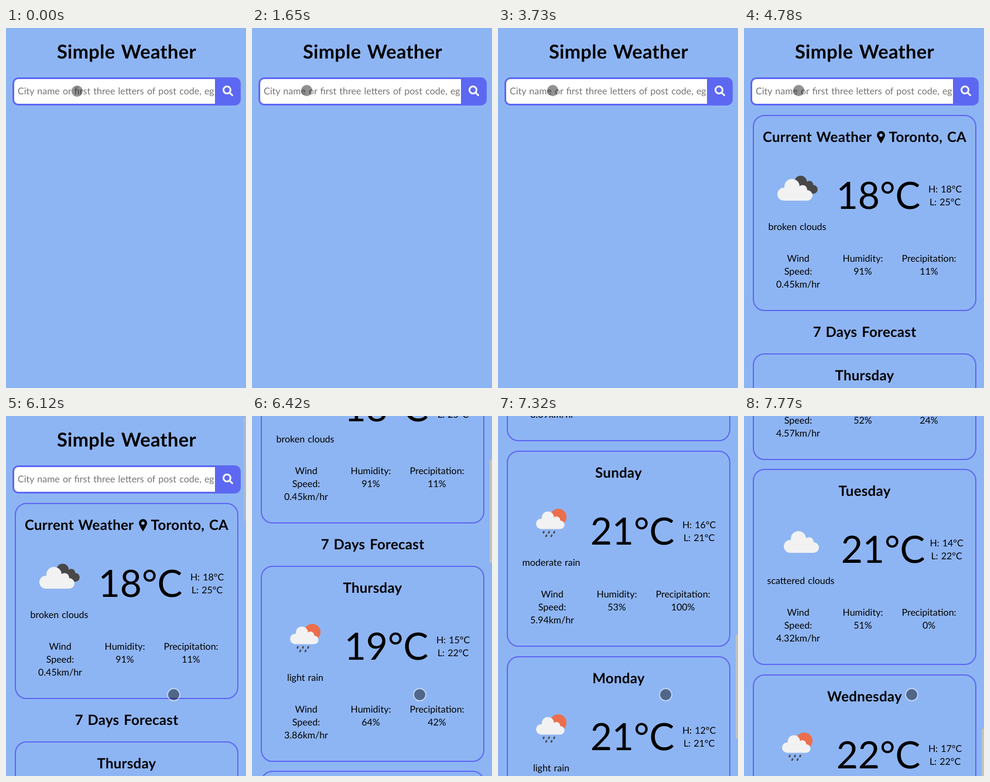
Write an HTML page with a canvas that moves like this. It is 410x613 px and loops after 8 s.

```html
<!DOCTYPE html>
<html lang="en">
<head>
<meta charset="utf-8">
<title>Weather</title>
<style>
html, body { margin: 0; width: 100%; height: 100%; overflow: hidden; background: #8eb5f3; }
canvas { display: block; width: 410px; height: 613px; }
</style>
</head>
<body>
<canvas id="stage"></canvas>
<script>
const W = 410, H = 613, LOOP = 8000, STEP = 150;
const BLUE = '#8eb5f3', VIOLET = '#5d68f2', SUN = '#ec6e4c', LIGHT = '#f2f2f2', DARK = '#484848';
const CARD_TOP = 148, DAYS_TOP = 554, PITCH = 349.75;
const FOCUS = 130, TYPING = 2400, TYPED = 3250, CLEARED = 3750, RESULTS = 4350, LEAVE = 5550, ARRIVE = 6150;
const QUERY = 'toronto';

const canvas = document.getElementById('stage');
const ctx = canvas.getContext('2d');
const dpr = window.devicePixelRatio || 1;
canvas.width = W * dpr;
canvas.height = H * dpr;
ctx.textRendering = 'geometricPrecision';

// title, sky, temperature, high, low, wind, humidity, precipitation
const [current, ...days] = `
Current Weather, broken clouds, 18, 18, 25, 0.45, 91, 11
Thursday, light rain, 19, 15, 22, 3.86, 64, 42
Friday, clear sky, 20, 14, 21, 6.68, 36, 17
Saturday, moderate rain, 18, 14, 22, 6.69, 58, 85
Sunday, moderate rain, 21, 16, 21, 5.94, 53, 100
Monday, light rain, 21, 12, 21, 4.57, 52, 24
Tuesday, scattered clouds, 21, 14, 22, 4.32, 51, 0
Wednesday, light rain, 22, 17, 22, 5.12, 49, 36
`.trim().split('\n').map(line => {
  const [title, sky, temp, high, low, wind, humidity, rain] = line.split(', ');
  return { title, sky, temp, high, low, wind, humidity, rain };
});

const clamp = u => Math.min(1, Math.max(0, u));
const progress = (t, start, length) => clamp((t - start) / length);
const easeInOut = u => u * u * (3 - 2 * u);
const flick = (t, start, length) => 1 - (1 - progress(t, start, length)) ** 1.27;

const stepped = t => Math.floor((t + 30) / STEP) * STEP;

const scrollAt = s =>
  299 * flick(s, 6150, 300) + 1245 * flick(s, 6600, 750) + 1399.5 * flick(s, 7500, 750);

function pointerAt(s) {
  const settle = progress(s, 0, 300);
  const leave = easeInOut(progress(s, LEAVE, ARRIVE - LEAVE));
  return [121.5 - 28 * settle + 193 * leave, 107.5 - settle + 368 * leave];
}

function queryAt(s) {
  if (s < TYPING || s >= CLEARED) return '';
  return QUERY.slice(0, 1 + (s - TYPING) / STEP);
}

function caretAt(t) {
  if (t < FOCUS || t > LEAVE + STEP) return false;
  if (t > TYPING && t < TYPED) return true;
  const start = t < TYPED ? FOCUS : TYPED;
  return Math.floor((t - start) / 480) % 2 === 0;
}

function text(str, x, y, { size = 16, bold = false, align = 'center', color = '#000' } = {}) {
  ctx.font = `${bold ? 'bold ' : ''}${size}px Lato, sans-serif`;
  ctx.wordSpacing = size * 0.066 + 'px';
  ctx.letterSpacing = bold ? size * 0.012 + 'px' : '0px';
  ctx.textAlign = align;
  ctx.fillStyle = color;
  ctx.fillText(str, x, y);
  return ctx.measureText(str).width;
}

function disc(x, y, r, color) {
  ctx.fillStyle = color;
  ctx.beginPath();
  ctx.arc(x, y, r, 0, Math.PI * 2);
  ctx.fill();
}

function box(x, y, w, h, radius, color) {
  ctx.fillStyle = color;
  ctx.beginPath();
  ctx.roundRect(x, y, w, h, radius);
  ctx.fill();
}

function cloud(x, y, scale, color) {
  ctx.save();
  ctx.translate(x, y);
  ctx.scale(scale, scale);
  disc(25, 13, 13, color);
  disc(43, 18.5, 8, color);
  disc(11, 26, 11, color);
  disc(51, 28, 9, color);
  box(11, 18, 39, 19, 0, color);
  ctx.restore();
}

// Icons are drawn relative to the first column and the card's top.
const icons = {
  'broken clouds'(x, y) {
    cloud(x - 15, y + 103.5, 0.83, DARK);
    cloud(x - 34, y + 109, 1, LIGHT);
  },
  'clear sky'(x, y) {
    disc(x + 0.5, y + 124.5, 24.5, SUN);
  },
  'scattered clouds'(x, y) {
    cloud(x - 29, y + 106, 1, LIGHT);
  },
  rain(x, y) {
    disc(x + 12, y + 113, 14, SUN);
    cloud(x - 26, y + 103.5, 0.81, LIGHT);
    ctx.strokeStyle = DARK;
    ctx.lineWidth = 2.6;
    ctx.beginPath();
    for (let i = 0; i < 5; i++) {
      const dropX = x - 13 + 4.5 * i, dropY = y + 139 + 6 * (i % 2);
      ctx.moveTo(dropX + 0.8, dropY - 2);
      ctx.lineTo(dropX - 0.8, dropY + 2);
    }
    ctx.stroke();
  }
};

function pin(x, y) {
  ctx.fillStyle = '#000';
  ctx.beginPath();
  ctx.arc(x, y, 7, Math.PI * 0.88, Math.PI * 2.12);
  ctx.quadraticCurveTo(x + 4, y + 8, x, y + 14);
  ctx.quadraticCurveTo(x - 4, y + 8, x - 6.5, y + 2.6);
  ctx.fill();
  disc(x, y, 2.8, BLUE);
}

function card(data, top) {
  if (top > H || top < -340) return;
  ctx.strokeStyle = VIOLET;
  ctx.lineWidth = 2;
  ctx.beginPath();
  ctx.roundRect(16, top + 1, 380, 332, 19);
  ctx.stroke();

  const heading = { size: 24, bold: true };
  if (data === current) {
    text(data.title, 32, top + 46, { ...heading, align: 'left' });
    pin(234, top + 34.5);
    text('Toronto, CA', 380, top + 46, { ...heading, align: 'right' });
  } else {
    text(data.title, 206, top + 46, heading);
  }

  // A long description widens the first column and pushes the others.
  const push = data.sky.length > 14 ? 1 : 0;
  const skyX = 91 + 6 * push, rangeX = 343.5 + 2.5 * push;
  (icons[data.sky] || icons.rain)(skyX, top);
  text(data.sky, skyX, top + 196);
  text(data.temp + '°C', 229.5 + 8 * push, top + 159.5, { size: 64 });
  text(`H: ${data.high}°C`, rangeX, top + 132);
  text(`L: ${data.low}°C`, rangeX, top + 154);

  const column = (x, ...lines) => lines.forEach((line, i) => text(line, x, top + 250 + 22 * i));
  column(92.5, 'Wind', 'Speed:', data.wind + 'km/hr');
  column(203, 'Humidity:', data.humidity + '%');
  column(316, 'Precipitation:', data.rain + '%');
}

function searchBar(query, caret, y) {
  box(11, y, 390, 48, 10, VIOLET);
  box(14, y + 3, 343, 42, [7, 0, 0, 7], '#fff');

  let caretX = 19;
  if (query) caretX = Math.round(20 + text(query, 20, y + 29, { align: 'left' }));
  else text('City name or first three letters of post code, eg', 20, y + 29, { align: 'left', color: '#757575' });
  if (caret) box(caretX, y + 13, 1, 22, 0, '#000');

  ctx.strokeStyle = '#fff';
  ctx.lineWidth = 3;
  ctx.lineCap = 'round';
  ctx.beginPath();
  ctx.arc(377.5, y + 21.5, 6, 0, Math.PI * 2);
  ctx.moveTo(382.5, y + 26.5);
  ctx.lineTo(386.5, y + 30.5);
  ctx.stroke();
  ctx.lineCap = 'butt';
}

function drawPointer(x, y) {
  disc(x, y, 9.7, 'rgba(0,0,0,0.43)');
  ctx.strokeStyle = 'rgba(255,255,255,0.5)';
  ctx.lineWidth = 1.6;
  ctx.beginPath();
  ctx.arc(x, y, 10.4, 0, Math.PI * 2);
  ctx.stroke();
}

function draw(t) {
  const s = stepped(t);
  const offset = scrollAt(s);
  const at = y => Math.floor(y - offset);
  ctx.setTransform(dpr, 0, 0, dpr, 0, 0);
  ctx.fillStyle = BLUE;
  ctx.fillRect(0, 0, W, H);

  text('Simple Weather', 206, at(52), { size: 32.5, bold: true });
  searchBar(queryAt(s), caretAt(t), at(84));
  if (s >= RESULTS) {
    card(current, at(CARD_TOP));
    text('7 Days Forecast', 206, at(526), { size: 24, bold: true });
    days.forEach((day, i) => card(day, at(DAYS_TOP + i * PITCH)));
  }

  ctx.globalAlpha = progress(s, ARRIVE - STEP, 2 * STEP);
  box(406, 2 + offset * 0.2396, 4, 177, 2, '#c1c1c1');
  ctx.globalAlpha = 1;
  drawPointer(...pointerAt(s));
}

function frame() {
  draw(performance.now() % LOOP);
  requestAnimationFrame(frame);
}
frame();
</script>
</body>
</html>
```
